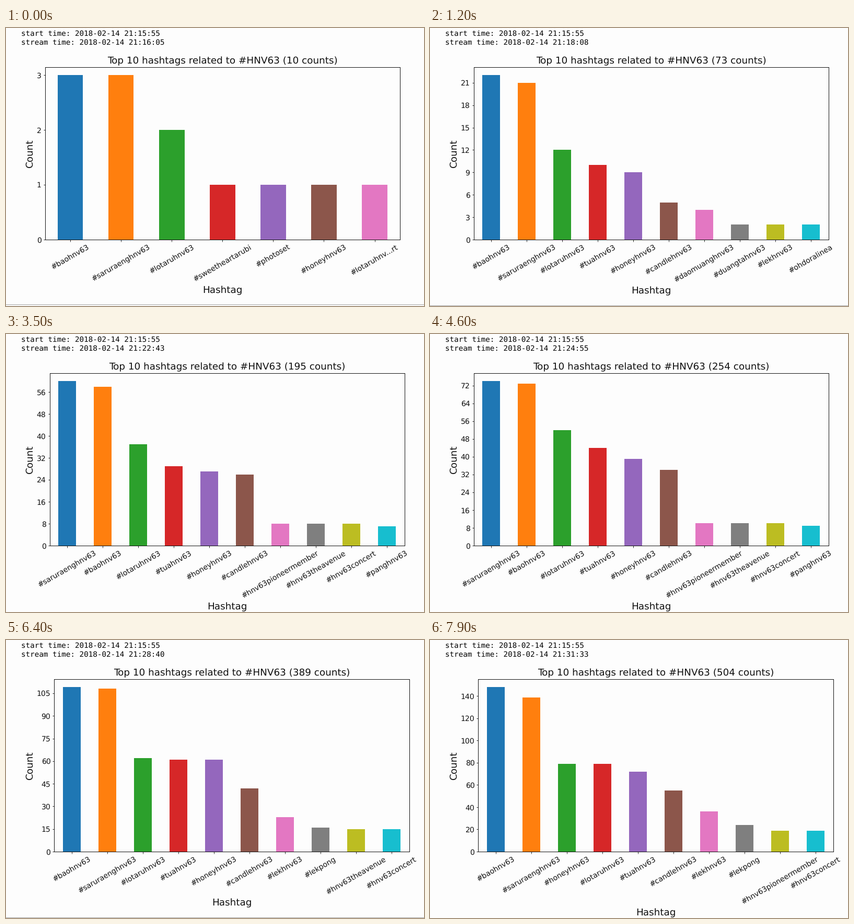
These frames come from a looping animation (800x532 px, 8 s). A matplotlib script:

```python
import numpy as np
import matplotlib.pyplot as plt
from collections import defaultdict
from matplotlib.animation import FuncAnimation
from matplotlib.ticker import MaxNLocator

W, H, DPI = 800, 532, 64
PT = 72 / DPI  # points per pixel
FRAMES, STEP_MS = 80, 100
INK = "#111111"
COLORS = plt.get_cmap("tab10").colors
START = 21 * 3600 + 15 * 60 + 55

# Stream progress: seconds elapsed and hashtags counted at a few frames.
KEYS = [0, 12, 25, 35, 46, 64, 79]
ELAPSED = [10, 133, 285, 408, 540, 765, 938]
TOTAL = [10, 73, 138, 195, 254, 389, 504]

# Trends: tag, total at which it appears, score then, share of later hashtags,
# and optionally the height and centre of a passing surge (or lull).
TRENDS = [
    ("#baohnv63", 10, 3.985, 0.2935, -8, 345),
    ("#saruraenghnv63", 10, 3.95, 0.275, 5.4, 200),
    ("#lotaruhnv63", 10, 2.26, 0.156, 12, 255),
    ("#tuahnv63", 10, 0.95, 0.145, 14.8, 315),
    ("#honeyhnv63", 10, 1.58, 0.158, -4.8, 140),
    ("#candlehnv63", 10, -1.36, 0.1142, 8.3, 235),
    ("#sweetheartarubi", 10, 1.6, 0, 3, 160),
    ("#photoset", 10, 1.5, 0),
    ("#lotaruhnv...rt", 10, 1.1, 0),
    ("#daomuanghnv63", 25, 4, 0.02),
    ("#duangtahnv63", 30, 2.9, 0),
    ("#lekhnv63", 40, 2.8, 0),
    ("#lekhnv63", 205, 0, 0.112),
    ("#ohdoralinea", 50, 2.7, 0),
    ("#panghnv63", 100, 5, 0.0293),
    ("#freehug", 110, 4.1, 0),
    ("#hnv63pioneermember", 155, 7.36, 0.036, -0.9, 389),
    ("#hnv63theavenue", 155, 7.24, 0.034, 0.6, 389),
    ("#hnv63concert", 155, 7.06, 0.036),
    ("#lekpong", 385, 16.2, 0.07),
]

plt.rcParams.update({
    "font.family": "DejaVu Sans",
    "text.hinting": "none",
    "text.color": INK,
    "axes.edgecolor": INK,
    "axes.labelcolor": INK,
    "xtick.color": INK,
    "ytick.color": INK,
    "axes.linewidth": PT,
})

fig = plt.figure(figsize=(W / DPI, H / DPI), dpi=DPI, facecolor="#fdfdfd")
ax = fig.add_axes([0.1, 0.2, 0.8, 0.6])


def at_key(values, i):
    return np.interp(i, KEYS, values)


def clock(sec):
    return f"2018-02-14 {sec // 3600:02d}:{sec // 60 % 60:02d}:{sec % 60:02d}"


def mono(y, text=""):
    return fig.text(28.9 / W, 1 - y / H, text, family="DejaVu Sans Mono",
                    size=14.25 * PT, color="black", va="baseline")


mono(15, "start time: " + clock(START))
stream = mono(32)
edge = plt.Line2D([0, 1], [0, 0], color="#a3a3a3", lw=PT, transform=fig.transFigure)
fig.add_artist(edge)


def trend(total, birth, base, share, surge=0, peak=0):
    if total < birth:
        return 0
    bump = np.exp(-((total - peak) / 55) ** 2 / 2)
    return base + share * (total - birth) + surge * bump


def top_ten(total):
    scores = defaultdict(float)
    for tag, *shape in TRENDS:
        scores[tag] += trend(total, *shape)
    ranked = sorted(scores, key=scores.get, reverse=True)[:10]
    tags = [tag for tag in ranked if scores[tag] >= 1]
    return tags, [int(scores[tag]) for tag in tags]


def draw(i):
    total = at_key(TOTAL, i)
    tags, counts = top_ten(total)
    n, top = len(tags), counts[0] * 1.05
    ax.clear()
    ax.set_facecolor("none")

    ax.bar(range(n), counts, 0.5, color=COLORS[:n])
    ax.set_xlim(-0.5, n - 0.5)
    ax.set_ylim(0, top)
    ax.yaxis.set_major_locator(MaxNLocator(integer=True))

    # the plot shifts right as the count labels gain digits
    digits = len(str(int(max(t for t in ax.get_yticks() if t <= top))))
    left = 74.6 + 8.9 * (digits - 1)
    ax.set_position([left / W, 1 - 405 / H, 679.5 / W, 330.3 / H])

    ax.set_xticks(range(n), tags, rotation=30)
    ax.tick_params(labelsize=13.95 * PT, length=3.5 * PT, width=0.9 * PT, pad=3.5 * PT)
    ax.set_xlabel("Hashtag", size=18.4 * PT, labelpad=6 * PT)
    ax.set_ylabel("Count", size=18.4 * PT, labelpad=3.8 * PT)
    ax.set_title(f"Top 10 hashtags related to #HNV63 ({round(total)} counts)",
                 size=18.4 * PT, pad=6 * PT)

    stream.set_text("stream time: " + clock(START + round(at_key(ELAPSED, i))))

    # chart border sits just under the axis label
    bottom = ax.xaxis.get_tightbbox(fig.canvas.get_renderer()).y0
    edge.set_ydata([(bottom - 18.5) / H] * 2)
    return []


anim = FuncAnimation(fig, draw, frames=FRAMES, interval=STEP_MS,
                     repeat=True, repeat_delay=0, blit=False)
plt.show()
```
